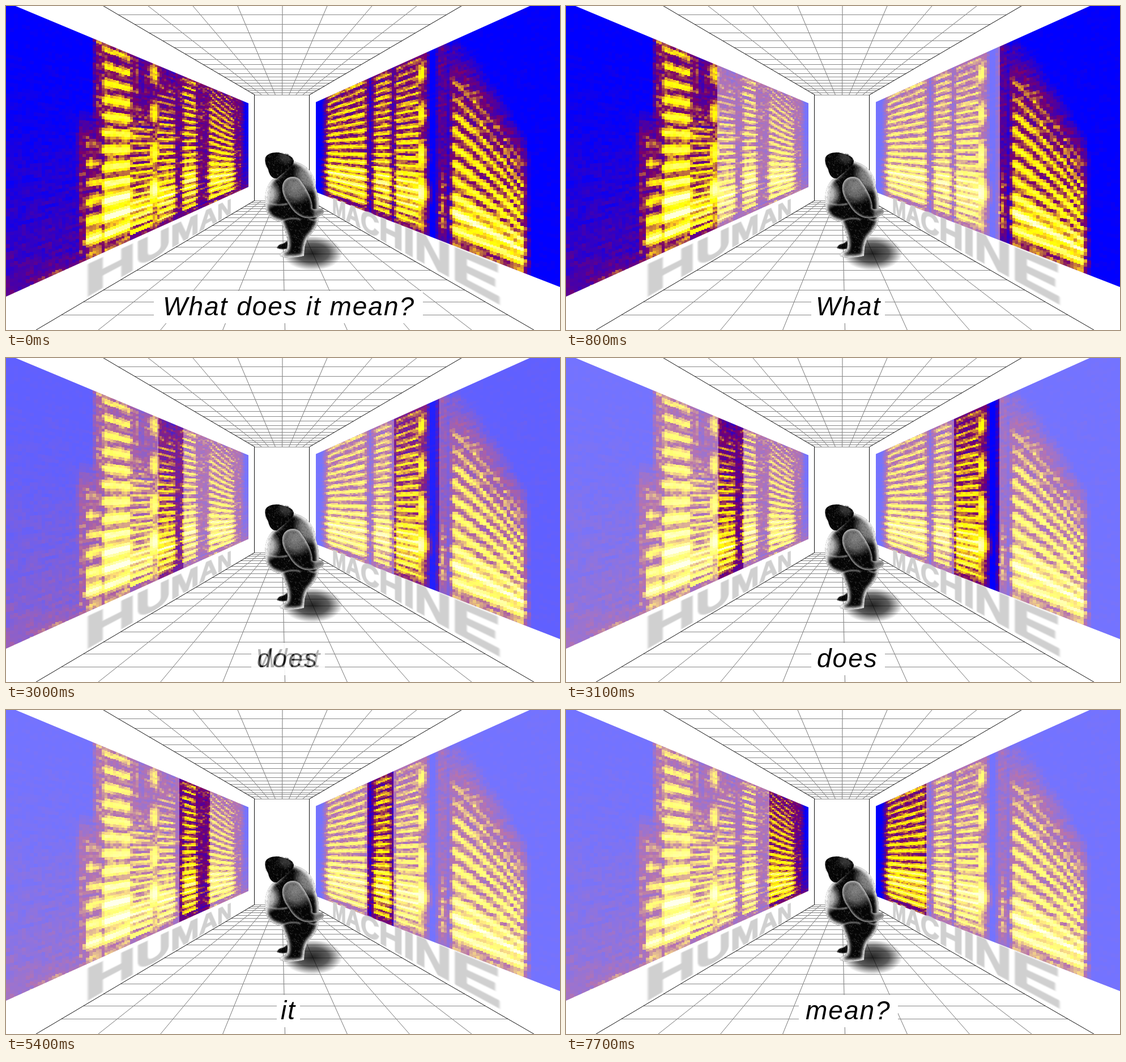
An HTML page with a canvas for the animation above (8 s loop, 978x573 px).

```html
<!DOCTYPE html>
<html lang="en">
<head>
<meta charset="utf-8">
<title>What does it mean?</title>
<style>
html, body { margin: 0; width: 978px; height: 573px; overflow: hidden; background: #fff; }
body { position: relative; font-family: "Liberation Sans", Arial, sans-serif; }
canvas { position: absolute; left: 0; top: 0; }
.sign { position: absolute; left: 0; top: 0; font: bold 100px/100px "Liberation Sans", Arial, sans-serif;
  color: #d0d0d0; -webkit-text-stroke: 4px #d0d0d0; white-space: nowrap; transform-origin: 0 0; filter: blur(1px); }
.word { position: absolute; top: 504px; height: 57px; background: #fff; color: #000; overflow: hidden; }
.word span { position: absolute; top: 1px; font: italic 46px/53px "Liberation Sans", Arial, sans-serif;
  letter-spacing: 2px; white-space: nowrap; }
</style>
</head>
<body>
<canvas id="stage" width="978" height="573"></canvas>
<div class="sign" id="human">HUMAN</div>
<div class="sign" id="machine">MACHINE</div>
<script>
const W = 978, H = 573, LOOP = 8000, VEIL = 0.45;
const clamp = (v, a = 0, b = 1) => Math.min(b, Math.max(a, v));
const mix = (a, b, t) => a + (b - a) * t;

function seeded(s) {
  return () => {
    s = (s + 0x6D2B79F5) | 0;
    let t = Math.imul(s ^ (s >>> 15), 1 | s);
    t = (t + Math.imul(t ^ (t >>> 7), 61 | t)) ^ t;
    return ((t ^ (t >>> 14)) >>> 0) / 4294967296;
  };
}

// ---------- room ----------
const room = document.createElement('canvas');
room.width = W; room.height = H;
const g = room.getContext('2d');

function line(x1, y1, x2, y2, color) {
  g.strokeStyle = color;
  g.beginPath(); g.moveTo(x1, y1); g.lineTo(x2, y2); g.stroke();
}

// Grid plane between back wall and stage edge; cross lines shrink by a fixed ratio towards the vanishing point
function plane(yBack, yFront, left, right, yVanish, reach) {
  for (let i = 1; i < 8; i++)
    line(mix(439, 536, i / 8), yBack, mix(left, right, i / 8), yFront, '#777');
  const dir = Math.sign(yFront - yBack), near = Math.abs(yBack - yVanish);
  for (let d = reach; d > near + 1; d /= 1.11) {
    const y = yVanish + dir * d, t = (y - yBack) / (yFront - yBack), row = Math.floor(y) + 0.5;
    line(mix(439, left, t), row, mix(536, right, t), row, '#888');
  }
  line(439, yBack + 0.5, 536, yBack + 0.5, '#888');
  line(439, yBack, left, yFront, '#111');
  line(536, yBack, right, yFront, '#111');
}

function drawRoom() {
  g.fillStyle = '#fff';
  g.fillRect(0, 0, W, H);
  g.lineWidth = 1;
  plane(157, 0, 172, 804, 185.5, 170);
  plane(344, 573, 53, 932, 315.2, 231);
  line(438.5, 157, 438.5, 344, '#111');
  line(535.5, 157, 535.5, 344, '#111');
}

// ---------- spectrogram walls ----------
const walls = {
  left: { x0: 0, x1: 428, top: x => -7 + 0.4185 * x, bottom: x => 514 - 0.4533 * x, haze: 14, hiss: 0.34, voices: [] },
  right: { x0: 547, x1: 978, top: x => 170 - 0.45 * (x - 547), bottom: x => 329 + 0.39 * (x - 547), haze: 4, hiss: 0, voices: [] }
};
const tall = (wall, x) => wall.bottom(x) - wall.top(x);

function strip(ctx, wall, a, b) {
  ctx.beginPath();
  ctx.moveTo(a, wall.top(a)); ctx.lineTo(b, wall.top(b));
  ctx.lineTo(b, wall.bottom(b)); ctx.lineTo(a, wall.bottom(a));
  ctx.closePath();
}

// A spoken sound: harmonics stacked on the floor of the wall, pitch falling by `drop`,
// one hot formant, and a purple haze around and above it
function voice(wall, x0, x1, top, period, drop = 0, loud = 0) {
  const reach = (wall.bottom(x0) - top) / period;
  wall.voices.push((x, y) => {
    const u = clamp((x - x0) / (x1 - x0));
    const pitch = period * tall(wall, x) / tall(wall, x0) * (1 - drop * u);
    const k = (wall.bottom(x) - y) / pitch, t = 1 - k / reach;
    const side = Math.max(x0 - x, x - x1, 0), above = Math.max(0, -t);
    const formant = 0.16 * Math.exp(-Math.pow((t - 0.72) / 0.13, 2));
    const body = mix(0.62, 0.8, clamp(t)) + 0.19 * Math.cos(2 * Math.PI * k) + formant + loud;
    const fade = side * 0.06 + above * 0.5 + Math.max(0, above - 0.35) * 2 + Math.max(0, t - 0.93) * 6;
    const haze = 0.46 + loud / 3 - Math.max(0, side - wall.haze) * 0.05 - Math.max(0, above - 0.4) * 1.4;
    return Math.max(body - fade, haze);
  });
}

voice(walls.left, 145, 166, 290, 34);
voice(walls.left, 174, 218, 150, 30, 0, 0.1);
voice(walls.left, 222, 256, 235, 13);
voice(walls.left, 258, 266, 95, 70);
voice(walls.left, 270, 296, 205, 13);
voice(walls.left, 315, 333, 160, 12);
voice(walls.left, 361, 400, 185, 12, 0.12);
voice(walls.right, 570, 633, 185, 11);
voice(walls.right, 653, 676, 155, 12);
voice(walls.right, 691, 728, 168, 13);
voice(walls.right, 730, 737, 85, 70);
voice(walls.right, 768, 774, 72, 400, 0, -0.35);
voice(walls.right, 791, 912, 205, 29, 0.48, 0.04);

// Blue through purple to yellow, then towards white
function tint(e) {
  const r = clamp(e * 0.95 + Math.max(0, e - 0.55) * 1.2);
  const gr = clamp((e - 0.52) * 3.2);
  const b = clamp(1 - e * 1.15) + clamp((e - 0.88) * 3.5, 0, 0.85);
  return `rgb(${[r, gr, b].map(v => Math.round(v * 255))})`;
}

function drawWall(wall, seed) {
  const rnd = seeded(seed), rows = 74, echo = new Array(rows + 4).fill(0);
  g.save();
  strip(g, wall, wall.x0, wall.x1);
  g.clip();
  for (let x = wall.x0; x < wall.x1;) {
    const w = Math.round(1 + tall(wall, x) / 85), cx = x + w / 2;
    const top = wall.top(cx), step = (wall.bottom(cx) - top) / rows;
    for (let r = -2; r < rows + 2; r++) {
      const y = Math.round(top + r * step), next = Math.round(top + (r + 1) * step), v = r / rows;
      // noise smears sideways along each row
      const n = echo[r + 2] = echo[r + 2] * 0.45 + (rnd() - 0.5) * 0.8;
      const floor = wall.hiss * (v * v * 0.9 + 0.5 * Math.max(0, v - 0.93) * 14);
      let e = Math.max(0, floor, ...wall.voices.map(f => f(cx, (y + next) / 2)));
      e = Math.max(0, e + n * (0.07 + 0.3 * clamp(1 - Math.abs(2 * e - 0.9))));
      g.fillStyle = tint(e);
      g.fillRect(x, y, w, next - y);
    }
    x += w;
  }
  g.restore();
}

// ---------- figure ----------
const shape = {
  farFoot: 'M478 428Q480 421 489 420L497 415L501 428Q488 433 478 428Z',
  body: 'M504 274C530 278 546 296 547 322C553 338 553 352 552 378C548 398 536 404 532 412C526 424 527 434 526 442' +
    'C512 446 490 446 484 442C482 436 494 434 496 430C500 412 492 398 486 382C466 378 456 366 458 348' +
    'C456 330 462 312 474 304C484 296 490 286 504 274Z',
  head: 'M458 268C462 259 478 257 488 261C502 263 511 270 507 279C500 288 488 296 478 305' +
    'C470 306 464 298 463 289C459 281 456 275 458 268Z',
  arm: 'M488 318C490 302 508 298 518 306C532 324 542 344 541 358C548 362 556 354 561 362' +
    'C562 370 550 374 540 375C522 378 508 366 500 352C492 340 486 330 488 318Z'
};

function glow(x, y, r, color, alpha) {
  const f = g.createRadialGradient(x, y, 0, x, y, r);
  f.addColorStop(0, `rgba(${color},${alpha})`);
  f.addColorStop(0.55, `rgba(${color},${alpha * 0.75})`);
  f.addColorStop(1, `rgba(${color},0)`);
  g.fillStyle = f;
  g.fillRect(x - r, y - r, 2 * r, 2 * r);
}

function fur(count, shade, alpha, rnd) {
  g.lineWidth = 0.8;
  for (let i = 0; i < count; i++) {
    const x = 456 + rnd() * 106, y = 256 + rnd() * 188, c = rnd() < 0.5 ? 0 : shade;
    line(x, y, x + rnd() * 3 - 1, y + 1 + rnd() * 2, `rgba(${c},${c},${c},${alpha})`);
  }
}

function part(d, rim, alpha, lights, rnd) {
  const path = new Path2D(d);
  g.save();
  g.fillStyle = '#060606';
  g.fill(path);
  g.clip(path);
  lights.forEach(([x, y, r, a]) => glow(x, y, r, '255,255,255', a));
  g.filter = `blur(${rim / 3}px)`;
  g.strokeStyle = `rgba(255,255,255,${alpha})`;
  g.lineWidth = rim;
  if (alpha) g.stroke(path);
  g.filter = 'none';
  fur(2600, 200, 0.24, rnd);
  g.restore();
}

// Ragged hair along the outline of the head
function hair(rnd) {
  for (let i = 0; i < 160; i++) {
    const a = rnd() * 2 * Math.PI, c = Math.cos(a), s = Math.sin(a), len = 1 + rnd() * 3;
    const x = 483 + 22 * c, y = 277 + 16 * s;
    line(x, y, x + c * len, y + s * len + 1, 'rgba(0,0,0,0.45)');
  }
}

function drawFigure() {
  const rnd = seeded(9);
  g.save();
  g.translate(541, 437); g.scale(1, 0.58);
  glow(0, 0, 53, '0,0,0', 0.85);
  g.restore();
  part(shape.farFoot, 2, 0.4, [], rnd);
  part(shape.body, 8, 0.95, [[456, 332, 30, 0.9], [540, 298, 34, 0.6]], rnd);
  g.save();
  g.filter = 'blur(0.8px)';
  g.lineWidth = 1.8;
  g.strokeStyle = 'rgba(255,255,255,0.65)';
  g.stroke(new Path2D('M462 348Q478 354 497 350M486 381Q505 372 520 378M534 376Q545 382 551 376'));
  g.restore();
  part(shape.arm, 5, 0.55, [[512, 318, 34, 0.5], [552, 366, 12, 0.5]], rnd);
  part(shape.head, 1, 0, [[494, 266, 16, 0.2]], rnd);
  hair(rnd);
}

drawRoom();
drawWall(walls.left, 21);
drawWall(walls.right, 57);
drawFigure();

// ---------- wall lettering ----------
// Maps the capital-letter box of an element onto a quad (TL, TR, BR, BL)
function project(id, [[x0, y0], [x1, y1], [x2, y2], [x3, y3]]) {
  const el = document.getElementById(id), pad = 7, capTop = 15.8, capHeight = 68.8;
  const ax = x1 - x2, ay = y1 - y2, bx = x3 - x2, by = y3 - y2;
  const sx = x0 - x1 + x2 - x3, sy = y0 - y1 + y2 - y3, det = ax * by - bx * ay;
  const p = (sx * by - bx * sy) / det, q = (ax * sy - sx * ay) / det;
  const m = [x1 - x0 + p * x1, y1 - y0 + p * y1, 0, p,
    x3 - x0 + q * x3, y3 - y0 + q * y3, 0, q, 0, 0, 1, 0, x0, y0, 0, 1];
  el.style.transform = `matrix3d(${m.map(v => v.toFixed(8))}) ` +
    `scale(${1 / (el.offsetWidth - 2 * pad)}, ${1 / capHeight}) translate(${-pad}px, ${-capTop}px)`;
}
project('human', [[148, 456], [396, 342], [396, 367], [148, 510]]);
project('machine', [[578, 340], [864, 457], [864, 522], [578, 367]]);

// ---------- scenes ----------
// box: caption edges, x: text start, left/right: lit span on each wall, early: veil weight of the first step
const scenes = [
  { at: 0, text: 'What does it mean?', box: [261, 736], x: 277 },
  { at: 500, text: 'What', box: [433, 563], x: 441, left: [0, 267], right: [766, 978] },
  { at: 2800, text: 'does', box: [433, 563], x: 443, left: [269, 313], right: [685, 765], early: 0.8 },
  { at: 5100, text: 'it', box: [478, 519], x: 485, left: [306, 360], right: [638, 684] },
  { at: 7400, text: 'mean?', box: [411, 586], x: 423, left: [359, 428], right: [547, 636] }
];

scenes.forEach((s, i) => {
  s.el = document.createElement('div');
  s.el.className = 'word';
  s.el.style.cssText = `left:${s.box[0]}px;width:${s.box[1] - s.box[0]}px;z-index:${9 - i}`;
  const span = document.createElement('span');
  span.textContent = s.text;
  span.style.left = s.x - s.box[0] + 'px';
  s.el.append(span);
  document.body.append(s.el);
});

const ctx = document.getElementById('stage').getContext('2d');

function veil(scene, weight) {
  if (!scene.left || !weight) return;
  ctx.fillStyle = `rgba(255,255,255,${VEIL * weight})`;
  for (const side of ['left', 'right']) {
    const wall = walls[side], [a, b] = scene[side];
    for (const [from, to] of [[wall.x0, a], [b, wall.x1]])
      if (to > from) { strip(ctx, wall, from, to); ctx.fill(); }
  }
}

// Each scene crossfades from the one before in four steps of 100 ms
function render(t) {
  const now = scenes.findLastIndex(s => t >= s.at);
  const step = now ? Math.min(4, 1 + Math.floor((t - scenes[now].at) / 100)) : 4;
  const rise = 1 - Math.pow(1 - step / 4, 1.3), fall = 1 - Math.pow(step / 4, 1.15);
  ctx.drawImage(room, 0, 0);
  scenes.forEach((s, i) => {
    const weight = i === now ? rise : i === now - 1 ? fall : 0;
    s.el.style.opacity = weight;
    veil(s, i === now && step === 1 && s.early || weight);
  });
}

const start = performance.now();
function tick() {
  render((performance.now() - start) % LOOP);
  requestAnimationFrame(tick);
}
tick();
</script>
</body>
</html>
```
